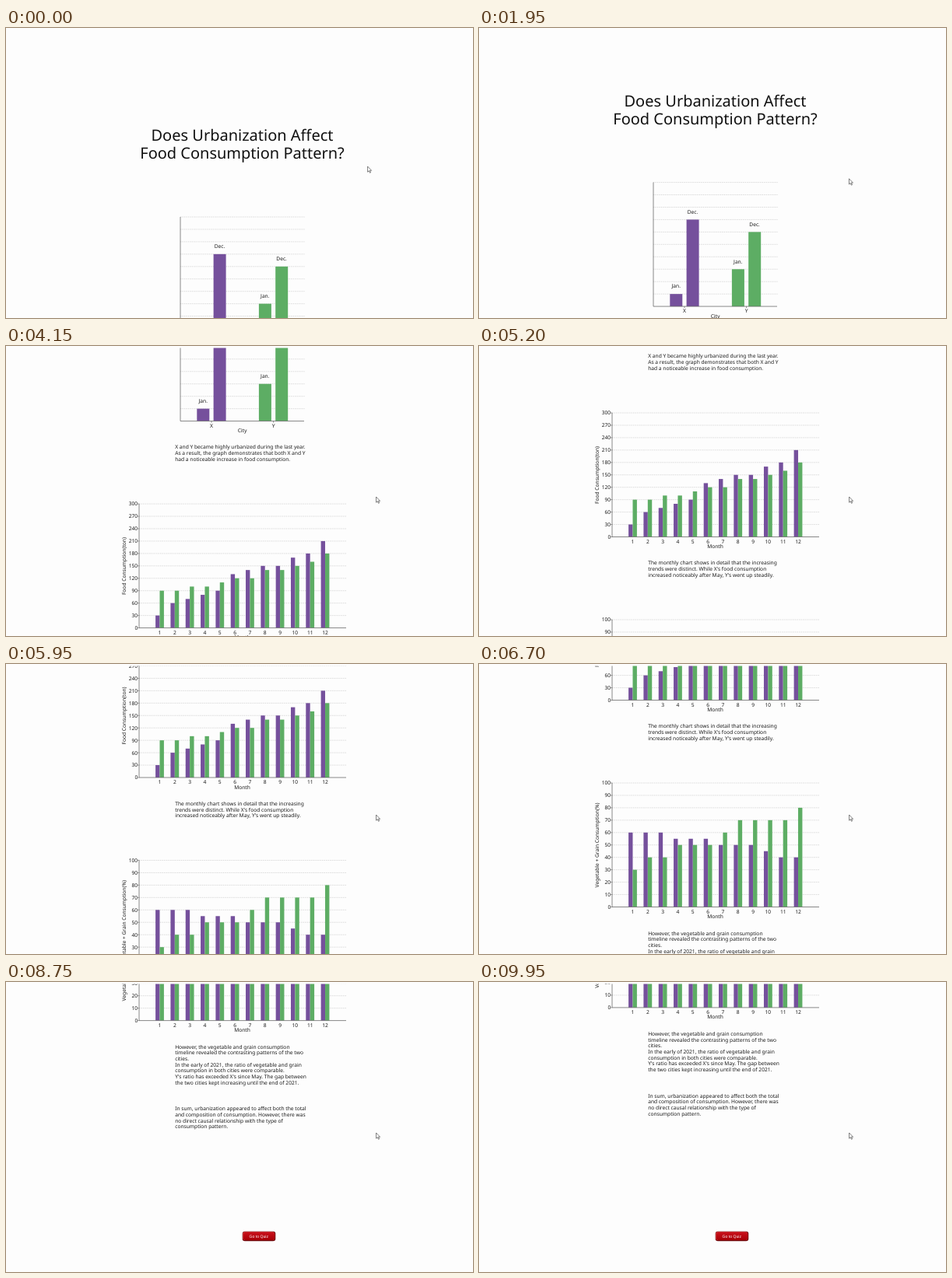
Animation of 600 by 373 pixels, one loop 10000 ms. Source, as an HTML page:

```html
<!DOCTYPE html>
<html lang="en">
<head>
<meta charset="utf-8">
<title>Urbanization and food</title>
<style>
  html, body { margin: 0; width: 100%; height: 100%; overflow: hidden; background: #fdfdfd; }
  svg { display: block; width: 600px; height: 373px; }
  text { font: 6.67px "Noto Sans", "Open Sans", sans-serif; fill: #1c1c1c; text-rendering: geometricPrecision; }
  text.title { font-size: 20px; fill: #111; }
  text.btn { font: 5.1px "Liberation Sans", Arial, sans-serif; fill: #fff; }
  .axis { stroke: #6a6a6a; stroke-width: .8; fill: none; }
  .grid { stroke: #c8c8c8; stroke-width: .7; stroke-dasharray: 1.35 1.1; }
</style>
</head>
<body>
<svg viewBox="0 0 600 373">
  <defs>
    <linearGradient id="red" x1="0" y1="0" x2="0" y2="1">
      <stop offset="0" stop-color="#c9101a"/>
      <stop offset="1" stop-color="#a80008"/>
    </linearGradient>
  </defs>
  <g id="page"></g>
  <rect width="600" height="2.5" fill="#fdfdfd"/>
  <g id="button" opacity="0">
    <rect x="303.7" y="320.8" width="42.6" height="12.4" rx="3.2" fill="#6d0508"/>
    <rect x="304.2" y="321.2" width="41" height="10.9" rx="2.8" fill="#dd4a4c"/>
    <rect x="304.9" y="321.9" width="40.3" height="10.2" rx="2.4" fill="url(#red)"/>
    <text class="btn" x="324.8" y="328.7" text-anchor="middle">Go to Quiz</text>
  </g>
  <path id="cursor" d="M0 0V7.2L1.7 5.7L2.9 8.3L4 7.8L2.9 5.3H5Z" fill="#fff" stroke="#4a4a4a" stroke-width=".7"/>
</svg>
<script>
const PURPLE = '#75509c', GREEN = '#5dad64';
const LOOP = 10000, STEP = 50, CENTER = 303.5, HEIGHT = 159.5;
const page = document.getElementById('page');
const button = document.getElementById('button');
const cursor = document.getElementById('cursor');

function add(tag, attrs, label) {
  const el = document.createElementNS('http://www.w3.org/2000/svg', tag);
  for (const key in attrs) el.setAttribute(key, attrs[key]);
  if (label !== undefined) el.textContent = label;
  page.appendChild(el);
}

const text = (label, x, y, anchor = 'middle', extra = {}) =>
  add('text', { x, y, 'text-anchor': anchor, ...extra }, label);
const line = (cls, d) => add('path', { class: cls, d });
const bar = (x, base, width, height, fill) =>
  add('rect', { x, y: base - height, width, height, fill });

function paragraph(y, lines) {
  lines.forEach((label, i) => text(label, 217.2, y + i * 7.67, 'start'));
}

function grid(left, right, top) {
  for (let i = 0; i < 10; i++) line('grid', `M${left} ${top + i * HEIGHT / 10}H${right}`);
}

function axes(left, right, top) {
  line('axis', `M${left} ${top}V${top + HEIGHT}H${right}`);
}

function cityChart(top) {
  const base = top + HEIGHT, unit = HEIGHT / 10;
  grid(224, 384, top);
  [['X', 264, PURPLE, 1, 7], ['Y', 343.6, GREEN, 3, 6]].forEach(([name, x, fill, jan, dec]) => {
    bar(x - 18.7, base, 16, jan * unit, fill);
    bar(x + 2.6, base, 16, dec * unit, fill);
    text('Jan.', x - 10.8, base - jan * unit - 7.7);
    text('Dec.', x + 10.5, base - dec * unit - 7.7);
    line('axis', `M${x} ${base}v2`);
    text(name, x, base + 8.3);
  });
  axes(224, 383, top);
  text('City', CENTER, base + 14.8);
}

function monthChart(top, max, label, xs, ys) {
  const base = top + HEIGHT;
  grid(171, 437, top);
  xs.forEach((value, i) => {
    const x = 197.5 + i * 19.32;
    bar(x - 5.4, base, 5.4, value / max * HEIGHT, PURPLE);
    bar(x, base, 5.4, ys[i] / max * HEIGHT, GREEN);
    text(i + 1, x, base + 8.2);
  });
  axes(171, 437, top);
  for (let i = 0; i <= 10; i++) {
    const y = base - i * HEIGHT / 10;
    line('axis', `M169.3 ${y}H171`);
    text(i * max / 10, 169.2, y + 2.4, 'end');
  }
  text('Month', CENTER, base + 14.6);
  text(label, 0, 0, 'middle', { transform: `translate(153.8 ${base - 79.5}) rotate(-90)` });
}

text('Does Urbanization Affect', CENTER, 145.3, 'middle', { class: 'title' });
text('Food Consumption Pattern?', CENTER, 168.3, 'middle', { class: 'title' });

cityChart(243);
paragraph(438.4, [
  'X and Y became highly urbanized during the last year.',
  'As a result, the graph demonstrates that both X and Y',
  'had a noticeable increase in food consumption.'
]);

monthChart(509, 300, 'Food Consumption(ton)',
  [30, 60, 70, 80, 90, 130, 140, 150, 150, 170, 180, 210],
  [90, 90, 100, 100, 110, 120, 120, 140, 140, 150, 160, 180]);
paragraph(704.4, [
  'The monthly chart shows in detail that the increasing',
  "trends were distinct. While X's food consumption",
  "increased noticeably after May, Y's went up steadily."
]);

monthChart(775, 100, 'Vegetable + Grain Consumption(%)',
  [60, 60, 60, 55, 55, 55, 50, 50, 50, 45, 40, 40],
  [30, 40, 40, 50, 50, 50, 60, 70, 70, 70, 70, 80]);
paragraph(970.5, [
  'However, the vegetable and grain consumption',
  'timeline revealed the contrasting patterns of the two',
  'cities.',
  'In the early of 2021, the ratio of vegetable and grain',
  'consumption in both cities were comparable.',
  "Y's ratio has exceeded X's since May. The gap between",
  'the two cities kept increasing until the end of 2021.'
]);
paragraph(1050.2, [
  'In sum, urbanization appeared to affect both the total',
  'and composition of consumption. However, there was',
  'no direct causal relationship with the type of',
  'consumption pattern.'
]);

// Scroll positions as [time, offset]
const SCROLL = [[1600, 0], [3000, 177.7], [5200, 423], [6700, 622], [7550, 729.8], [8750, 884.9], [9750, 901.6]];

const progress = (t, from, to) => Math.min(1, Math.max(0, (t - from) / (to - from)));
const easeOut = p => 1 - (1 - p) ** 2;

function scrollAt(t) {
  let y = 0;
  for (let i = 1; i < SCROLL.length; i++) {
    const [t0, y0] = SCROLL[i - 1], [t1, y1] = SCROLL[i];
    const p = progress(t, t0, t1);
    y += (y1 - y0) * (i === SCROLL.length - 1 ? easeOut(p) : p);
  }
  return y;
}

function draw(now) {
  const t = Math.floor(now % LOOP / STEP) * STEP;
  const move = easeOut(progress(t, 1550, 2000));
  page.setAttribute('transform', `translate(0 ${-scrollAt(t)})`);
  cursor.setAttribute('transform', `translate(${464.6 + 11 * move} ${178 + 16 * move})`);
  button.setAttribute('opacity', progress(t, 8200, 8650));
}

const start = performance.now();
function tick() {
  draw(performance.now() - start);
  requestAnimationFrame(tick);
}
tick();
</script>
</body>
</html>
```
